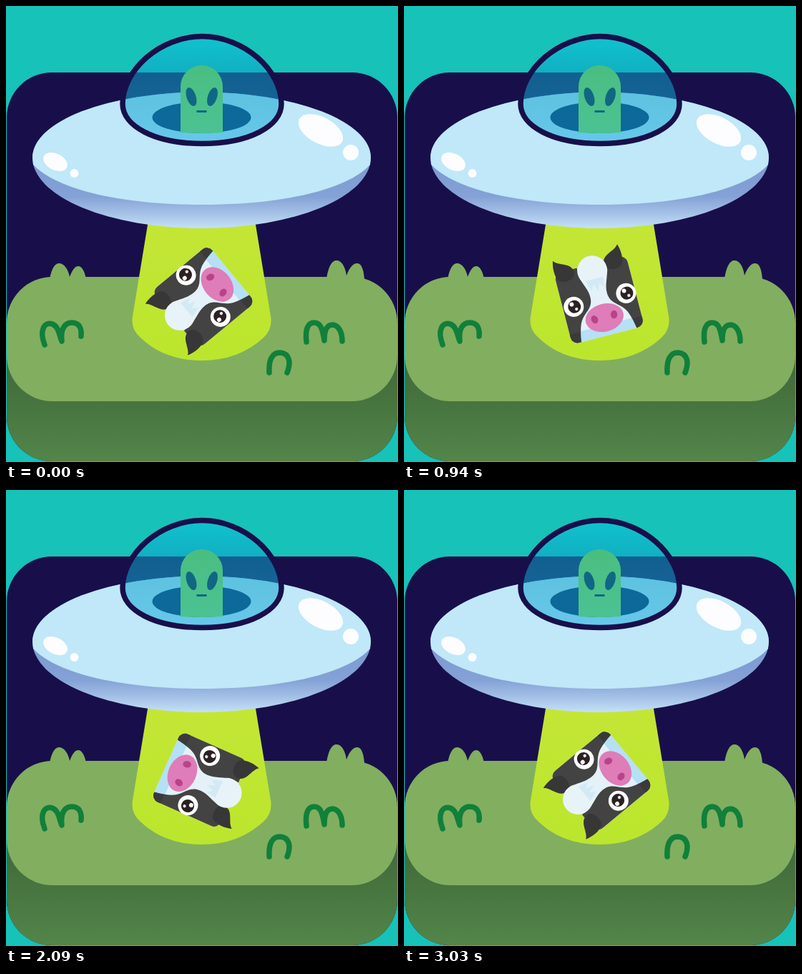
These frames come from a looping animation (548x638 px, 3060 ms). An HTML page:

```html
<!DOCTYPE html>
<html lang="en">
<head>
<meta charset="utf-8">
<title>Saucer and spinning cow</title>
<style>
  html, body { margin: 0; width: 100%; height: 100%; overflow: hidden; background: #17c2b8; }
  svg { display: block; width: 548px; height: 638px; }
</style>
</head>
<body>
<svg viewBox="0 0 548 638">
  <defs>
    <linearGradient id="soil" gradientUnits="userSpaceOnUse" x1="0" y1="500" x2="0" y2="638">
      <stop offset="0" stop-color="#416b3c"/>
      <stop offset=".4" stop-color="#47743f"/>
      <stop offset="1" stop-color="#53864a"/>
    </linearGradient>
    <linearGradient id="beam" x2="0" y2="1">
      <stop offset="0" stop-color="#c4e635"/>
      <stop offset="1" stop-color="#bbe62d"/>
    </linearGradient>
    <linearGradient id="hull" gradientUnits="userSpaceOnUse" x1="0" y1="222" x2="0" y2="311">
      <stop offset="0" stop-color="#7c9ad0"/>
      <stop offset=".5" stop-color="#84a2d6"/>
      <stop offset=".75" stop-color="#a3bfe6"/>
      <stop offset="1" stop-color="#c5e0f7"/>
    </linearGradient>
    <linearGradient id="glass" x2="0" y2="1">
      <stop offset="0" stop-color="#0cc3e0"/>
      <stop offset=".36" stop-color="#0c9fc8"/>
      <stop offset="1" stop-color="#20b0de"/>
    </linearGradient>
    <linearGradient id="skin" x2="0" y2="1">
      <stop offset="0" stop-color="#4abe80"/>
      <stop offset="1" stop-color="#4cc293"/>
    </linearGradient>
    <clipPath id="panel"><rect x="1" y="93" width="546" height="544" rx="63"/></clipPath>
    <clipPath id="head"><rect x="-53" y="-48" width="104" height="102" rx="10"/></clipPath>
    <path id="dome" d="M163 137C163 90 215 42.500 274 42.500C333 42.500 385 90 385 137C385 168 340 192.500 274 192.500C208 192.500 163 168 163 137Z"/>
    <g id="eye">
      <circle r="14" fill="#fff"/>
      <circle cx="1" r="9" fill="#2b2022"/>
      <circle cx="-2" cy="-4" r="3" fill="#fff"/>
      <circle cx="3" cy="4" r="2.2" fill="#e8e4e4"/>
    </g>
    <path id="ear" d="M-50-66C-44-57-26-58-25-44C-25-33-41-31-48-36C-54-43-53-57-50-66Z" fill="#373737"/>
    <path id="patch" d="M-60-60H-20V-38C-20-26-12-17-12-4C-12 14-27 14-34 30Q-38 40-41 60H-60Z" fill="#434344"/>
  </defs>

  <rect width="548" height="638" fill="#17c2b8"/>
  <g clip-path="url(#panel)">
    <rect width="548" height="638" fill="#180f4a"/>
    <rect y="460" width="548" height="178" fill="url(#soil)"/>
    <rect x="1" y="379" width="546" height="174" rx="64" fill="#82ae60"/>
    <g fill="#82ae60">
      <path d="M61 382C64 366 69 360 74 360C81 360 87 368 89 379C93 368 97 364 101 364C106 364 110 371 112 382Z"/>
      <path d="M448 382C451 363 456 356 462 356C469 356 474 364 476 377C481 364 486 360 491 360C497 360 500 369 501 382Z"/>
    </g>
  </g>
  <g fill="none" stroke="#10803a" stroke-width="7.5" stroke-linecap="round" stroke-linejoin="round">
    <path d="M54 474C46 453 54 441 65 445C74 449 74 460 78 469C76 452 82 443 92 443C103 443 106 452 105 462"/>
    <path d="M420 470C418 452 422 443 431 443C441 443 443 456 445 468C445 452 449 446 457 446C466 447 470 458 470 469"/>
    <path d="M368 513C367 495 372 485 383 485C396 486 399 498 393 513"/>
  </g>

  <path d="M199 300H348L370 434Q373 452 360 464Q325 496 274 496Q221 496 188 464Q174 452 177 434Z" fill="url(#beam)"/>

  <g id="cow">
    <g clip-path="url(#head)">
      <rect x="-60" y="-60" width="120" height="120" fill="#e4f1f8"/>
      <rect x="-60" y="39" width="120" height="20" fill="#b5e0f5"/>
      <use href="#patch"/>
      <use href="#patch" transform="scale(-1 1)"/>
      <path d="M-60 40H-38L-41 60H-60ZM60 40H38L41 60H60Z" fill="#3a3a3b"/>
    </g>
    <use href="#ear"/>
    <use href="#ear" transform="translate(-7 0) scale(-1 1)"/>
    <circle cy="-39" r="21" fill="#e8f3f9"/>
    <path d="M-13-27L-8-12L-3-20L1-9L5-20L10-13L13-27Z" fill="#d3eaf4"/>
    <ellipse cy="29" rx="27" ry="19.500" fill="#de7db8"/>
    <g fill="#b94389">
      <ellipse cx="-14" cy="28" rx="4.600" ry="5.800" transform="rotate(-15 -14 28)"/>
      <ellipse cx="14" cy="28" rx="4.600" ry="5.800" transform="rotate(15 14 28)"/>
    </g>
    <use href="#eye" x="-37.800" y="3.500"/>
    <use href="#eye" x="37.800" y="3.500"/>
  </g>

  <path d="M37 212A236.500 91.500 0 0 1 510 212A236.500 99 0 0 1 37 212Z" fill="url(#hull)"/>
  <path d="M37 212A236.500 91.500 0 0 1 510 212L509 222C478 256 390 278 274 278C158 278 70 256 38 222Z" fill="#c0e8f8"/>
  <g fill="#fdfdff">
    <ellipse cx="69" cy="218" rx="18" ry="11.500" transform="rotate(27 69 218)"/>
    <circle cx="95.500" cy="234" r="6"/>
    <ellipse cx="440" cy="174" rx="34" ry="18.500" transform="rotate(28 440 174)"/>
    <circle cx="482" cy="205" r="11"/>
  </g>

  <use href="#dome" fill="url(#glass)" fill-opacity=".56"/>
  <ellipse cx="273.500" cy="156" rx="69" ry="22" fill="#0d6999"/>
  <path d="M244 177V112.500A29.500 29.500 0 0 1 303 112.500V177Q274 179 244 177Z" fill="url(#skin)"/>
  <g fill="#106784">
    <ellipse cx="259" cy="127" rx="6.500" ry="13.500" transform="rotate(-18 259 127)"/>
    <ellipse cx="288.500" cy="127" rx="6.500" ry="13.500" transform="rotate(18 288.500 127)"/>
    <rect x="266.500" y="146" width="14" height="3"/>
  </g>
  <use href="#dome" fill="none" stroke="#180f4a" stroke-width="7.500"/>
</svg>
<script>
  const LOOP = 3060;
  // [time in ms, angle in degrees]; the spin eases off briefly mid-loop
  const spin = [[0, 230.3], [1330, 393], [1760, 433], [3030, 590.3], [LOOP, 590.3]];
  const cow = document.getElementById('cow');

  function angleAt(t) {
    const i = spin.findIndex(([end]) => t < end);
    const [t0, a0] = spin[i - 1], [t1, a1] = spin[i];
    return a0 + (a1 - a0) * (t - t0) / (t1 - t0);
  }

  function draw() {
    const angle = angleAt(performance.now() % LOOP);
    cow.setAttribute('transform', `translate(273 408) rotate(${angle})`);
    requestAnimationFrame(draw);
  }
  draw();
</script>
</body>
</html>
```
